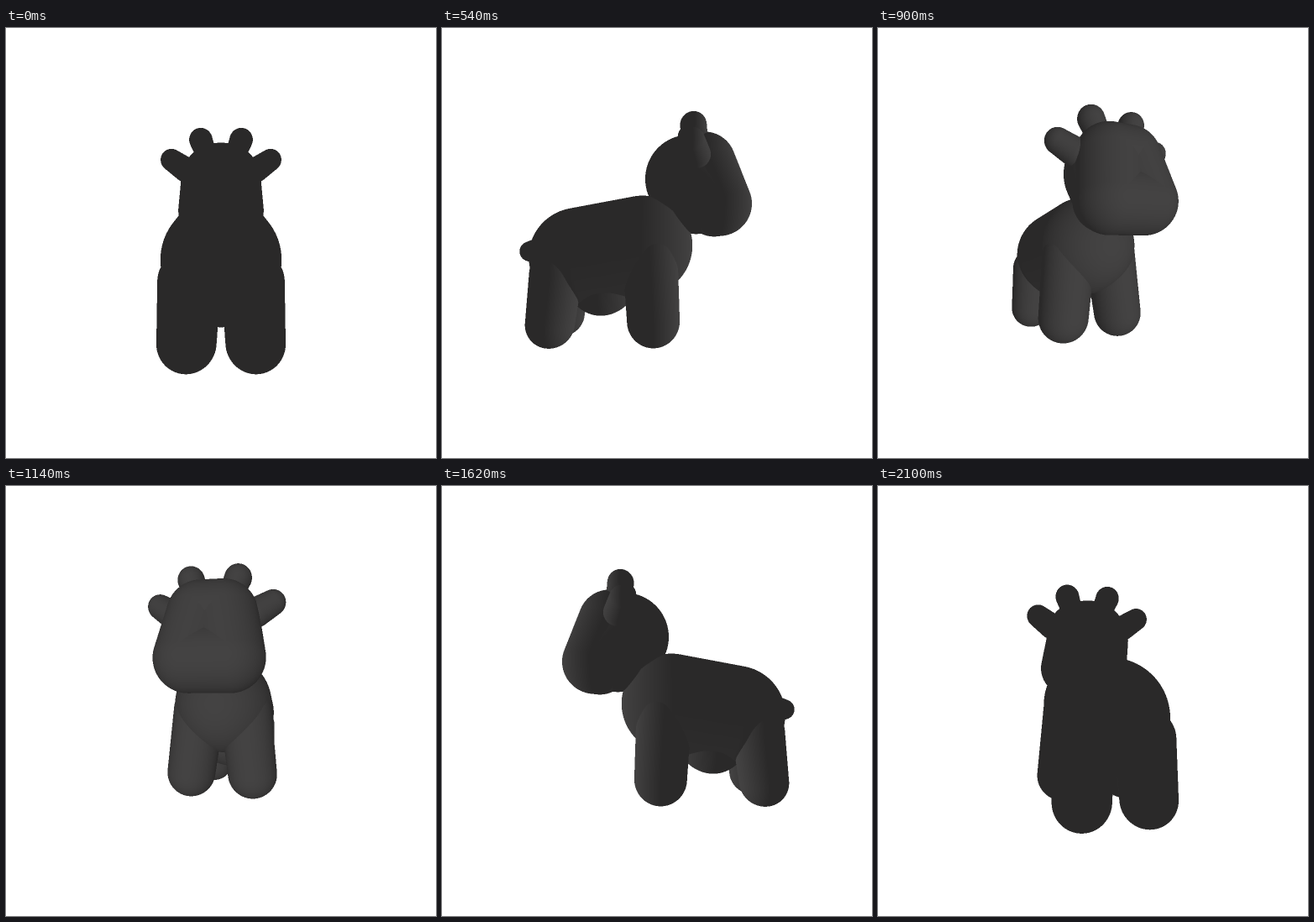
Animation of 512 by 512 pixels, one loop 2.16 s. Source, as an HTML page with a canvas:

```html
<!DOCTYPE html>
<html>
<head>
<meta charset="utf-8">
<title>Turning toy cow</title>
<style>
html, body { margin: 0; width: 100%; height: 100%; overflow: hidden; background: #fff; }
canvas { display: block; }
</style>
</head>
<body>
<canvas id="stage" width="512" height="512"></canvas>
<script>
const SIZE = 512, SS = 2, N = SIZE * SS, DIST = 490, STEPS = 36, STEP_MS = 60;
const ctx = document.getElementById('stage').getContext('2d');

// Balls are [forward, up, side, radius]; a part is the hull of two balls.
const parts = [];
const add = (a, b) => parts.push([a, b]);
const flip = ([u, h, w, r]) => [u, h, -w, r];
const pair = (a, b) => { add(a, b); add(flip(a), flip(b)); };
const across = a => add(a, flip(a));

const skull = [37, 76, 0.1, 51], brow = [54, 91, 12, 37], muzzle = [71, 44, 22, 36], jaw = [48, 45, 14, 34];
add([-92, -16, 0, 58], [-17, -3, 0, 59]);            // trunk
add([-66, -46, 0, 40], [-64, -45, 0, 40]);           // belly
add([-151, -10, 0, 12], [-125, -2, 0, 14]);          // tail
pair([-119, -90, 31, 27], [-113, -35, 29, 29]);      // hind legs
pair([-4, -86, 37, 29], [-8, -10, 28, 31]);          // front legs
pair(skull, muzzle);
pair(brow, muzzle);
[skull, brow, muzzle, jaw].forEach(across);
pair([36, 106, 63, 14], [42, 95, 46, 16]);           // ears
pair([41, 133, 26, 15], [46, 112, 18, 13]);          // horns

const dot = (a, b) => a[0] * b[0] + a[1] * b[1] + a[2] * b[2];
const big = document.createElement('canvas');
big.width = big.height = N;
const bigCtx = big.getContext('2d');
const image = bigCtx.createImageData(N, N);
const pixels = new Uint32Array(image.data.buffer);
const depth = new Float32Array(N * N);

// Pixel range covered by two balls along one axis
function span(a, b, axis, sign) {
  const edges = [a, b].flatMap(p => {
    const s = DIST / (DIST - p[2]), c = sign * p[axis] * s, r = p[3] * s * 1.15 + 2;
    return [c - r, c + r];
  });
  const clamp = v => Math.max(0, Math.min(N, Math.round((v + SIZE / 2) * SS)));
  return [clamp(Math.min(...edges)), clamp(Math.max(...edges))];
}

// Ray casting of a round cone, seen from (0, 0, DIST)
function drawPart(a, b, sin, cos) {
  const ra = a[3], rb = b[3], rr = ra - rb;
  const ba = [b[0] - a[0], b[1] - a[1], b[2] - a[2]];
  const oa = [-a[0], -a[1], DIST - a[2]], ob = [-b[0], -b[1], DIST - b[2]];
  const m0 = dot(ba, ba), m1 = dot(ba, oa), m5 = dot(oa, oa), m7 = dot(ob, ob);
  const d2 = m0 - rr * rr;
  const k0 = d2 * m5 - m1 * m1 + 2 * m1 * rr * ra - m0 * ra * ra;
  const [x0, x1] = span(a, b, 0, 1), [y0, y1] = span(a, b, 1, -1);
  // Parts of the surface normal along the light, which shines on the face
  const light = v => v[0] * sin - v[2] * cos;
  const baL = light(ba), oaL = light(oa), obL = light(ob);

  for (let j = y0; j < y1; j++) {
    const py = SIZE / 2 - (j + 0.5) / SS;
    for (let i = x0; i < x1; i++) {
      const px = (i + 0.5) / SS - SIZE / 2;
      const len = Math.sqrt(px * px + py * py + DIST * DIST);
      const dx = px / len, dy = py / len, dz = -DIST / len;
      const m2 = ba[0] * dx + ba[1] * dy + ba[2] * dz;
      const m3 = oa[0] * dx + oa[1] * dy + oa[2] * dz;
      const m6 = ob[0] * dx + ob[1] * dy + ob[2] * dz;
      const dL = dx * sin - dz * cos;
      const k = j * N + i;
      let best = depth[k], lit = -2;

      const k2 = d2 - m2 * m2, k1 = d2 * m3 - m1 * m2 + m2 * rr * ra;
      const h = k1 * k1 - k0 * k2;
      if (h > 0) {
        const t = (-Math.sqrt(h) - k1) / k2, y = m1 - ra * rr + t * m2;
        if (y > 0 && y < d2 && t > 0 && t < best) {
          best = t;
          lit = (d2 * (oaL + t * dL) - baL * y) / (d2 * ra - 0) * 1;
          lit /= Math.max(1e-6, Math.sqrt(
            (d2 * (oa[0] + t * dx) - ba[0] * y) ** 2 +
            (d2 * (oa[1] + t * dy) - ba[1] * y) ** 2 +
            (d2 * (oa[2] + t * dz) - ba[2] * y) ** 2) / (d2 * ra));
        }
      }
      const ha = m3 * m3 - m5 + ra * ra, hb = m6 * m6 - m7 + rb * rb;
      if (ha > 0) {
        const t = -m3 - Math.sqrt(ha);
        if (t < best) { best = t; lit = (oaL + t * dL) / ra; }
      }
      if (hb > 0) {
        const t = -m6 - Math.sqrt(hb);
        if (t < best) { best = t; lit = (obL + t * dL) / rb; }
      }
      if (lit > -2) {
        const c = 41 + Math.round(26 * Math.max(0, lit));
        depth[k] = best;
        pixels[k] = 0xff000000 | c << 16 | c << 8 | (c + 1);
      }
    }
  }
}

function render(step) {
  const angle = step / STEPS * 2 * Math.PI, sin = Math.sin(angle), cos = Math.cos(angle);
  const turn = ([u, h, w, r]) => [u * sin + w * cos, h, w * sin - u * cos, r];
  pixels.fill(0);
  depth.fill(1e9);
  for (const [a, b] of parts) drawPart(turn(a), turn(b), sin, cos);
  bigCtx.putImageData(image, 0, 0);
  const view = document.createElement('canvas');
  view.width = view.height = SIZE;
  view.getContext('2d').drawImage(big, 0, 0, SIZE, SIZE);
  return view;
}

const views = [];
const start = performance.now();
let shown = -1;
function tick() {
  const step = Math.floor((performance.now() - start) / STEP_MS) % STEPS;
  if (step !== shown) {
    shown = step;
    views[step] = views[step] || render(step);
    ctx.clearRect(0, 0, SIZE, SIZE);
    ctx.drawImage(views[step], 0, 0);
  }
  requestAnimationFrame(tick);
}
tick();
</script>
</body>
</html>
```
